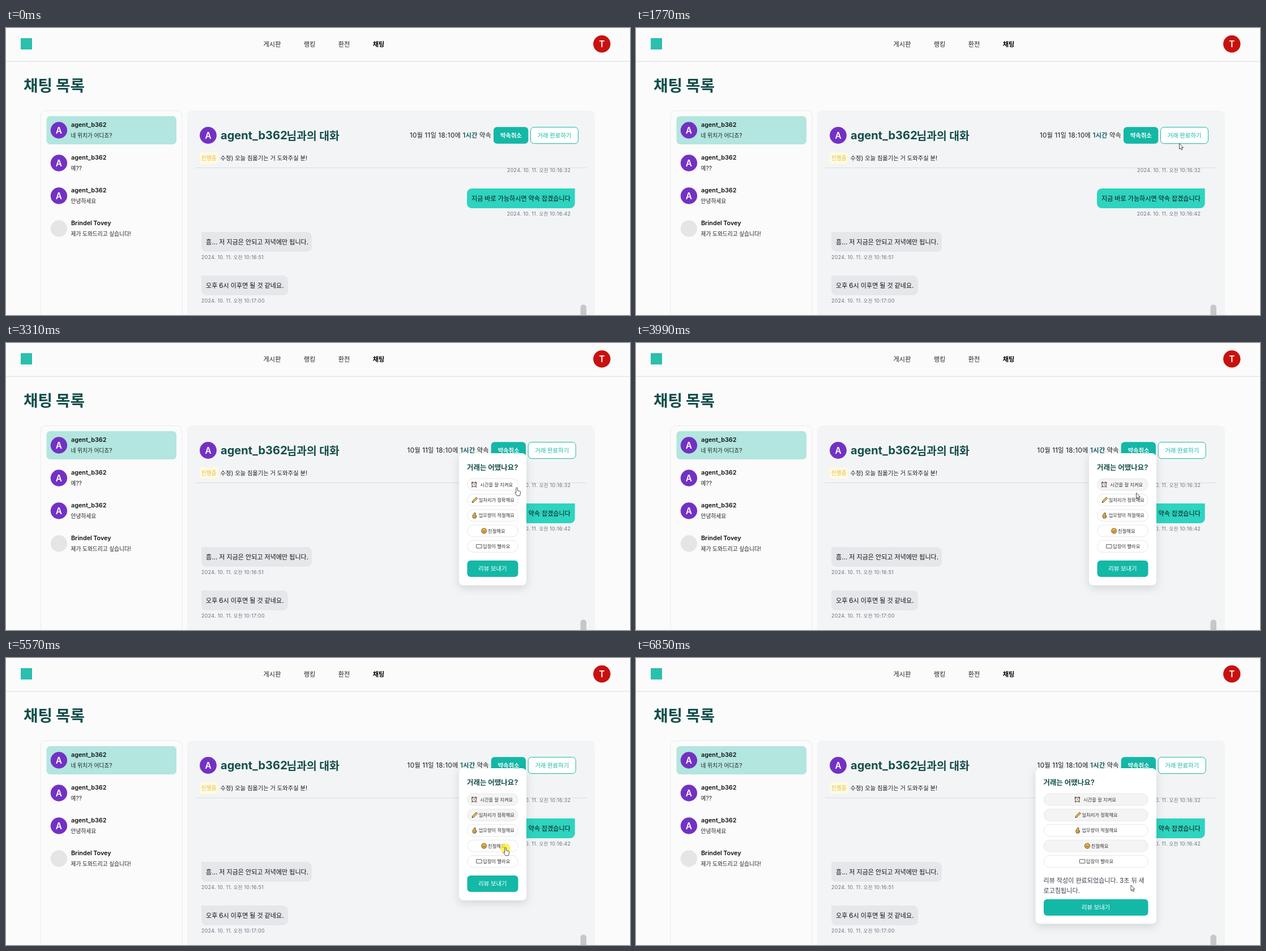
Recreate the animation shown at these times as an HTML page. Size 1102 px wide and 508 px high, loop 8000 ms.

```html
<!DOCTYPE html>
<html lang="ko">
<head>
<meta charset="utf-8">
<style>
  html, body { margin: 0; width: 100%; height: 100%; overflow: hidden; background: #fbfbfb; }
  svg { display: block; width: 1102px; height: 508px; }
  text { font-family: Inter, "Noto Sans CJK KR", "Noto Sans CJK", sans-serif; word-spacing: -.03em; white-space: pre; }
  .clock { letter-spacing: .02em; }
  .card { filter: drop-shadow(0 5px 8px #00000020); }
</style>
</head>
<body>
<svg viewBox="0 0 1102 508"><g id="page"></g><g id="live"></g></svg>
<script>
const TEAL = '#14b8a6', DEEP = '#0f766e', INK = '#134e4a', PURPLE = '#7331c4';
const USER = 'agent_b362';

// y is the vertical middle of the line; Hangul is set slightly smaller than Latin
function text(str, x, y, size, fill = '#1b1b1b', weight = 400, anchor = 'start') {
  const body = str.replace(/[가-힣]+/g, '<tspan font-size=".945em">$&</tspan>');
  return `<text x="${x}" y="${y + size * .37}" font-size="${size}" fill="${fill}" font-weight="${weight}" text-anchor="${anchor}">${body}</text>`;
}
const rect = (x, y, w, h, r, fill, stroke = 'none') =>
  `<rect x="${x}" y="${y}" width="${w}" height="${h}" rx="${r}" fill="${fill}" stroke="${stroke}"/>`;
const circle = (x, y, r, fill, extra = '') => `<circle cx="${x}" cy="${y}" r="${r}" fill="${fill}" ${extra}/>`;
const path = (d, fill, stroke = 'none', width = 1) =>
  `<path d="${d}" fill="${fill}" stroke="${stroke}" stroke-width="${width}" stroke-linejoin="round"/>`;
const at = (x, y, body) => `<g transform="translate(${x} ${y})">${body}</g>`;
const clock = body => `<g class="clock">${body}</g>`;
const avatar = (x, y, r, fill, letter) =>
  circle(x, y, r, fill) + text(letter, x, y + .2, 15.4, '#fff', 600, 'middle');

function contact(name, message, i) {
  const y = 181 + i * 58;
  return (name === USER ? avatar(93.4, y, 14.67, PURPLE, 'A') : circle(93.4, y, 14.67, '#e5e5e5'))
    + text(name, 115, y - 9.5, 10.8, '#111', 600)
    + text(message, 114.6, y + 9.5, 10.27, '#222');
}

function bubble(str, time, y, x, w, mine) {
  const h = 35, r = 8.8, arc = (dx, dy) => `a${r} ${r} 0 0 1 ${dx} ${dy}`;
  const start = mine ? `M${x} ${y + r}${arc(r, -r)}H${x + w}` : `M${x} ${y}H${x + w - r}${arc(r, r)}`;
  const shape = `${start}V${y + h - r}${arc(-r, r)}H${x + r}${arc(-r, -r)}z`;
  return path(shape, mine ? '#2dd4bf' : '#e5e7eb')
    + text(str, x + 8, y + 17.5, 11.73, '#111')
    + stamp(time, y + 44.5, mine);
}
const stamp = (time, y, mine) => clock(
  text('2024. 10. 11. 오전 ' + time, mine ? 997.3 : 345, y, 8.9, '#6b7280', 400, mine ? 'end' : 'start'));

page.innerHTML =
  rect(0, 0, 1102, 508, 0, '#fbfbfb')
  + rect(26, 18, 20, 20, 0, '#2bbfae')
  + ['게시판', '랭킹', '환전', '채팅'].map((s, i) =>
      text(s, [470, 536, 597, 658][i], 28.3, 11.9, i === 3 ? '#000' : '#222', i === 3 ? 600 : 400, 'middle')).join('')
  + avatar(1052.3, 28.2, 15.2, '#c8120f', 'T')
  + rect(0, 58.6, 1102, 1, 0, '#dadbdc')
  + text('채팅 목록', 31, 101.3, 29.33, INK, 700)
  + rect(61, 146.3, 250, 400, 9, '#fbfbfb', '#e8eaed')
  + rect(71.5, 156, 229.5, 50, 6.5, '#b2e6df')
  + [[USER, '네 위치가 어디죠?'], [USER, '예??'], [USER, '안녕하세요'], ['Brindel Tovey', '제가 도와드리고 싶습니다!']]
      .map(([name, message], i) => contact(name, message, i)).join('')
  + rect(320, 146, 720, 400, 9, '#f3f4f6')
  + stamp('10:16:32', 251.7, true)
  + rect(334, 200, 691, 47.5, 0, '#f3f4f6')
  + rect(334, 247, 691, 1, 0, '#d9dce0')
  + avatar(357, 190, 14.9, PURPLE, 'A')
  + text(USER, 379, 190, 20.1, INK, 700)
  + text('님과의 대화', 495.5, 190, 20.5, INK, 700)
  + rect(342, 220, 32.5, 20, 3, '#fefbe0')
  + text('진행중', 358.2, 230, 10.27, '#e9b84f', 400, 'middle')
  + text('수정) 오늘 짐옮기는 거 도와주실 분!', 378.5, 229.6, 10.9)
  + bubble('지금 바로 가능하시면 약속 잡겠습니다', '10:16:42', 284, 814, 190.7, true)
  + bubble('흠... 저 지금은 안되고 저녁에만 됩니다.', '10:16:51', 361, 345, 195, false)
  + bubble('오후 6시 이후면 될 것 같네요.', '10:17:00', 438, 345, 153, false)
  + rect(1014.5, 489.5, 10.5, 40, 5.2, '#c6c7c9');

const ICONS = [
  path('M-4.5-2.5l2-2.3M4.5-2.5l-2-2.3M-3 3.5l-1.2 1.3M3 3.5l1.2 1.3', 'none', '#6b2f25', 1.6)
    + circle(0, 0, 4, '#f6efe9', 'stroke="#4a332c"') + path('M0-2V.3L1.6 1', 'none', '#333', .7),
  path('M-4.7 4.7l.8-2.9L2.7-4.8l2.1 2.1L-1.8 3.9z', '#f6c945', '#3c3322', .9),
  path('M-2.6 4.8Q-5 1-2.7-1.5L.2-5 1.6-4 1-1.2Q4 .2 3 3L1.5 4.8z', '#f0b73d', '#4b3518', .9)
    + circle(.4, 1.3, 1.2, '#fff', 'stroke="#4b3518" stroke-width=".7"'),
  circle(0, 0, 4.6, '#f8bd3f', 'stroke="#6a4515" stroke-width=".9"')
    + path('M-2.5-1q.8-1 1.5 0M1-1q.8-1 1.5 0', 'none', '#513410', .8) + path('M-2.5 1h5Q0 4.6-2.5 1z', '#fff', '#513410', .7),
  rect(-4.8, -3.2, 9.6, 6.4, .4, '#fff', '#555'),
];
const REVIEWS = ['시간을 잘 지켜요', '일처리가 정확해요', '업무량이 적절해요', '친절해요', '답장이 빨라요'];
const PICKS = [3920, 4610, Infinity, 5640, Infinity];
const chipY = i => 250.5 + i * 27.35;
const POPUP = 2640, SENT = 6780;

function booking(dx, hover) {
  const tone = hover ? DEEP : TEAL;
  return at(dx, 0,
    clock(text('10월 11일 18:10에 <tspan font-weight="600" fill="#155e63">1시간</tspan> 약속', 857, 189.7, 11.73, '#1b1b1b', 400, 'end'))
    + rect(861, 175.3, 61.3, 29.4, 6, TEAL)
    + text('약속취소', 891.8, 189.7, 11, '#fff', 600, 'middle')
    + rect(926.5, 175.6, 84, 29, 6, '#fff', tone)
    + text('거래 완료하기', 968.5, 189.7, 11, tone, 400, 'middle'));
}

function popup(t, hover) {
  const sent = t >= SENT, left = sent ? 705.5 : 800, width = 919 - left;
  const x = left + 14.5, w = width - 29, cx = left + width / 2, buttonY = sent ? 427 : 385;
  return `<g class="card">${rect(left, 195, width, sent ? 275.5 : 234, 8, '#fff')}</g>`
    + text('거래는 어땠나요?', x - .5, 219.8, 13.2, INK, 600)
    + REVIEWS.map((s, i) => {
        const half = 4.4 * (.87 * s.replace(' ', '').length + .25 * (s.split(' ').length - 1));
        const y = chipY(i);
        return rect(x + .3, y - 10.4, w - .6, 20.8, 10.4, t >= PICKS[i] ? '#f4f4f5' : '#fff', '#e5e7eb')
          + at(cx - half, y, ICONS[i]) + text(s, cx + 6.8, y, 8.8, '#333', 400, 'middle');
      }).join('')
    + (sent ? text('리뷰 작성이 완료되었습니다. 3초 뒤 새', x - .5, 394, 11.73, '#374151')
        + text('로고침됩니다.', x - .5, 411.3, 11.73, '#374151') : '')
    + rect(x, buttonY, w, 29, 6, hover ? DEEP : TEAL)
    + text('리뷰 보내기', cx, buttonY + 14, 11, '#fff', 500, 'middle');
}

const ARROW = path('M0 0v9.9l2.2-2 1.6 3.5 1.7-.7-1.6-3.4h3.1z', '#fff', '#222', .8);
const HAND = path('M-1.3 .3q0-1.3 1.3-1.3t1.3 1.3V4.3l3.9.9q1.6.4 1.4 2l-.6 3.3-.7 2.8H.2L-3 8.6q-.5-1.5.8-1.4l.9.9z', '#fff', '#222', .8);

// start, end, number of steps, from, to, optional bend
const MOVES = [
  [520, 1020, 8, [1101, 534], [908, 315]],
  [1420, 1910, 8, [908, 315], [963, 197]],
  [3100, 3590, 8, [963, 197], [884, 252], [919, 274.5]],
  [3920, 4340, 7, [884, 252], [883, 279]],
  [4880, 5300, 7, [883, 279], [882, 336.5]],
  [5690, 6110, 7, [882, 336.5], [874, 402]],
];
const CLICKS = [2570, 3850, 4540, 5570, 6710];

function pointer(t) {
  const move = MOVES.filter(m => t >= m[0]).pop();
  if (!move) return [-50, -50];
  const [start, end, steps, from, to, bend] = move;
  const p = Math.min(1, (Math.floor((t - start) / (end - start) * (steps - 1) + 1e-6) + 1) / steps);
  const e = 1 - (1 - p) ** 2;
  return from.map((a, i) => {
    const c = bend ? bend[i] : (a + to[i]) / 2;
    return (1 - e) ** 2 * a + 2 * e * (1 - e) * c + e * e * to[i];
  });
}

function scene(t) {
  const open = t >= POPUP, dx = open ? -4.3 : 0;
  const [x, y] = pointer(t);
  const inside = (l, r, top, bottom) => x > l && x < r && y > top && y < bottom;
  const onFinish = inside(926 + dx, 1010 + dx, 176, 204);
  const onSend = open && t < SENT && inside(814, 905, 385, 414);
  const onChip = open && REVIEWS.some((_, i) => inside(814, 905, chipY(i) - 10.5, chipY(i) + 10.5));
  const hand = onSend || onChip || (onFinish && t >= 2110);
  const clicking = CLICKS.some(c => t >= c && t < c + 70);
  return booking(dx, onFinish)
    + (open ? popup(t, onSend) : '')
    + (clicking ? circle(x, y + .5, 9, '#fdee21', 'opacity=".75"') : '')
    + at(x, y, hand ? HAND : ARROW);
}

let shown;
function frame(now) {
  const next = scene(now % 8000);
  if (next !== shown) live.innerHTML = shown = next;
  requestAnimationFrame(frame);
}
frame(0);
</script>
</body>
</html>
```
